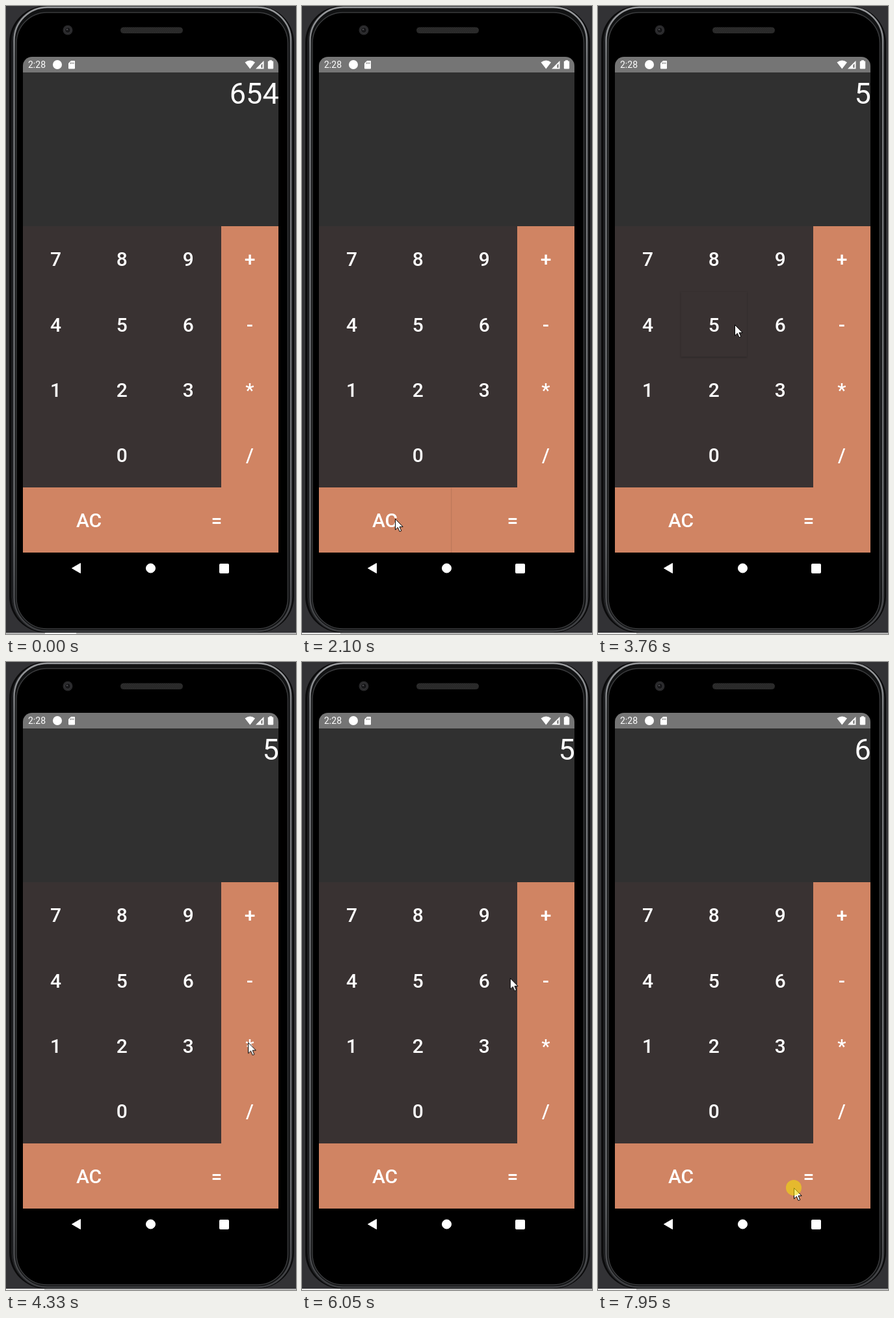
These frames come from a looping animation (446x964 px, 8 s). An HTML page:

```html
<!DOCTYPE html>
<html lang="en">
<head>
<meta charset="utf-8">
<title>Calculator</title>
<style>
html, body { margin: 0; width: 100%; height: 100%; overflow: hidden; background: #323235; }
svg { display: block; width: 100vw; height: 100vh; }
text { font-family: Roboto, Arial, sans-serif; fill: #fff; }
.key { font-size: 30px; font-weight: 500; text-anchor: middle; }
.value { font-size: 45px; text-anchor: end; }
.lift { opacity: 0; filter: drop-shadow(0 1px 1px rgba(0, 0, 0, .25)); }

.step { animation: 8s step-end infinite; }
.first { animation-name: first; }
.second { animation-name: second; }
.third { animation-name: third; }
.early { animation-name: early; }
.late { animation-name: late; }
.lift-ac { animation-name: lift-ac; }
.lift-5 { animation-name: lift-5; }
.lift-plus { animation-name: lift-plus; }
.click { animation-name: click; }
.shown { animation-name: shown; }
.cursor { animation: move 8s linear infinite; }

@keyframes first { 0% { opacity: 1 } 26.25%, 100% { opacity: 0 } }
@keyframes second { 0% { opacity: 0 } 43.4% { opacity: 1 } 80.5%, 100% { opacity: 0 } }
@keyframes third { 0% { opacity: 0 } 80.5%, 100% { opacity: 1 } }
@keyframes early { 0% { opacity: 1 } 22.5%, 100% { opacity: 0 } }
@keyframes late { 0% { opacity: 0 } 22.5%, 100% { opacity: 1 } }
@keyframes lift-ac { 0% { opacity: 0 } 26.25% { opacity: 1 } 28.125%, 100% { opacity: 0 } }
@keyframes lift-5 { 0% { opacity: 0 } 43.4% { opacity: 1 } 49.5%, 100% { opacity: 0 } }
@keyframes lift-plus { 0% { opacity: 0 } 68.5% { opacity: 1 } 71.5%, 100% { opacity: 0 } }
@keyframes shown { 0% { opacity: 0 } 6%, 100% { opacity: 1 } }
@keyframes click {
  0%, 23.25%, 42.875%, 68.5%, 80.375% { opacity: 0 }
  21.75%, 40.25%, 66.625%, 79%, 99.25%, 100% { opacity: .6 }
}
@keyframes move {
  0%, 6% { transform: translate(11px, 405px) }
  8.25%, 10.75% { transform: translate(153px, 406px) }
  12.5% { transform: translate(200px, 470px) }
  13.75% { transform: translate(206px, 560px) }
  16% { transform: translate(180px, 700px) }
  17.625% { transform: translate(148px, 776px) }
  19.25%, 33.625% { transform: translate(143px, 787px) }
  34.75% { transform: translate(180px, 690px) }
  36.25% { transform: translate(228.5px, 580px) }
  37.75% { transform: translate(215px, 525px) }
  39.5% { transform: translate(178px, 498px) }
  40.25%, 43.75% { transform: translate(176px, 497px) }
  46.25% { transform: translate(208px, 489px) }
  47%, 48.25% { transform: translate(210px, 489px) }
  50% { transform: translate(290px, 520px) }
  51.875%, 53.125% { transform: translate(368px, 564px) }
  55.6% { transform: translate(378px, 612px) }
  58.75% { transform: translate(370px, 560px) }
  61.875% { transform: translate(366px, 490px) }
  63.125% { transform: translate(374px, 460px) }
  63.375% { transform: translate(375px, 446px) }
  65.625% { transform: translate(384px, 396px) }
  66.25%, 69% { transform: translate(385px, 392px) }
  70.625% { transform: translate(372px, 430px) }
  72.75%, 74% { transform: translate(331px, 458px) }
  75.625% { transform: translate(320px, 485px) }
  78.125% { transform: translate(276px, 502px) }
  78.75%, 85.125% { transform: translate(274px, 503px) }
  88.125% { transform: translate(300px, 560px) }
  91.25% { transform: translate(343px, 650px) }
  95.125%, 95.75% { transform: translate(337px, 725px) }
  98.5% { transform: translate(304px, 803px) }
  99%, 100% { transform: translate(301px, 807px) }
}
</style>
</head>
<body>
<svg viewBox="0 0 446 964">
  <defs>
    <linearGradient id="rim" x2="0" y2="1">
      <stop offset="0" stop-color="#9a9c9f"/>
      <stop offset=".08" stop-color="#77797c"/>
      <stop offset=".85" stop-color="#696b6e"/>
      <stop offset="1" stop-color="#3c3d40"/>
    </linearGradient>
    <pattern id="mesh" width="3" height="3" patternUnits="userSpaceOnUse">
      <rect width="3" height="3" fill="#1c1c1c"/>
      <path d="M0 0h1.5v1.5H0zM1.5 1.5H3V3H1.5z" fill="#383838"/>
    </pattern>
  </defs>

  <!-- phone body -->
  <rect width="446" height="964" fill="#323235"/>
  <rect x="5" y="0" width="438" height="962" rx="56" fill="#0b0b0c"/>
  <rect x="9" y="1" width="431" height="960" rx="54" fill="#161719" stroke="#2b2c2e"/>
  <rect x="12.5" y="2" width="425.5" height="957.5" rx="51" fill="#111213" stroke="url(#rim)" stroke-width="2.5"/>
  <rect x="16" y="10" width="417.5" height="946" rx="47" fill="#000" stroke="#3a3b3d" stroke-width="1.5"/>
  <circle cx="95" cy="37" r="7.5" fill="#29292b"/>
  <circle cx="95" cy="37" r="4.5" fill="#161618" stroke="#3b3b3e"/>
  <circle cx="94" cy="36" r="1.3" fill="#48484c"/>
  <rect x="176.5" y="33" width="95" height="8.5" rx="4" fill="url(#mesh)" stroke="#2a2a2a"/>

  <!-- strip below the phone -->
  <rect y="962" width="446" height="2" fill="#b4b4b4"/>
  <rect class="step early" x="60" y="962" width="48" height="2" fill="#f4f4f4"/>
  <rect class="step late" y="962" width="59" height="2" fill="#e8e8e8"/>

  <!-- status bar -->
  <path d="M26 102V92a14 14 0 0 1 14-14H405a14 14 0 0 1 14 14V102Z" fill="#757575"/>
  <text x="34" y="95" font-size="14">2:28</text>
  <g fill="#fff">
    <circle cx="79" cy="90" r="7"/>
    <path d="M100 84h5a1 1 0 0 1 1 1v10.5a1 1 0 0 1-1 1h-8a1 1 0 0 1-1-1V88Z"/>
    <path d="M99.5 86.5v2.5M101.7 86.5v2.5M103.9 86.5v2.5" stroke="#757575"/>
    <path d="M367.5 86.5Q375.5 80.5 383 86.5L375.3 96.5Z"/>
    <path d="M396.5 84V96.5H384Z"/>
    <path d="M394.5 88.5v6.2h-2.2v-4Z" fill="#757575"/>
    <path d="M405 84.5v-1.3h4v1.3h1.2a1 1 0 0 1 1 1v10a1 1 0 0 1-1 1h-6.4a1 1 0 0 1-1-1v-10a1 1 0 0 1 1-1Z"/>
  </g>

  <!-- calculator -->
  <rect x="26" y="102" width="393" height="236" fill="#303030"/>
  <rect x="26" y="338" width="305" height="401" fill="#393232"/>
  <path d="M331 338H419V839H26V739H331Z" fill="#d08463"/>
  <rect class="lift step lift-5" x="127.5" y="438.5" width="101.5" height="100" fill="#393232"/>
  <rect class="lift step lift-plus" x="331" y="338" width="88" height="100" fill="#d08463"/>
  <rect class="lift step lift-ac" x="26" y="739" width="203" height="100" fill="#d08463"/>

  <g class="value">
    <text class="step first" x="419.7" y="149.5">654</text>
    <text class="step second" x="419.7" y="149.5">5</text>
    <text class="step third" x="419.7" y="149.5">6</text>
  </g>

  <g class="key">
    <text x="76.5" y="399.4">7</text><text x="178.3" y="399.4">8</text><text x="280.2" y="399.4">9</text><text x="375" y="399.4">+</text>
    <text x="76.5" y="499.6">4</text><text x="178.3" y="499.6">5</text><text x="280.2" y="499.6">6</text><text x="375" y="499.6">-</text>
    <text x="76.5" y="599.8">1</text><text x="178.3" y="599.8">2</text><text x="280.2" y="599.8">3</text><text x="375" y="599.8">*</text>
    <text x="178.3" y="700">0</text><text x="375" y="700">/</text>
    <text x="127.5" y="800.2">AC</text><text x="324" y="800.2">=</text>
  </g>

  <!-- navigation bar -->
  <g fill="#fff" stroke="#fff" stroke-linejoin="round">
    <path d="M101.5 863L114.5 855.5V870.5Z"/>
    <circle cx="222.5" cy="863" r="7"/>
    <rect x="328.5" y="856.5" width="14" height="14" rx="1"/>
  </g>

  <g class="step shown">
    <g class="cursor">
      <path d="M.5 .5V17L4.4 13.4L7.1 19.7L9.8 18.6L7.1 12.4H12.2Z" fill="#fff" stroke="#000"/>
      <circle class="step click" r="12" fill="#f3dc0c"/>
    </g>
  </g>
</svg>
</body>
</html>
```
